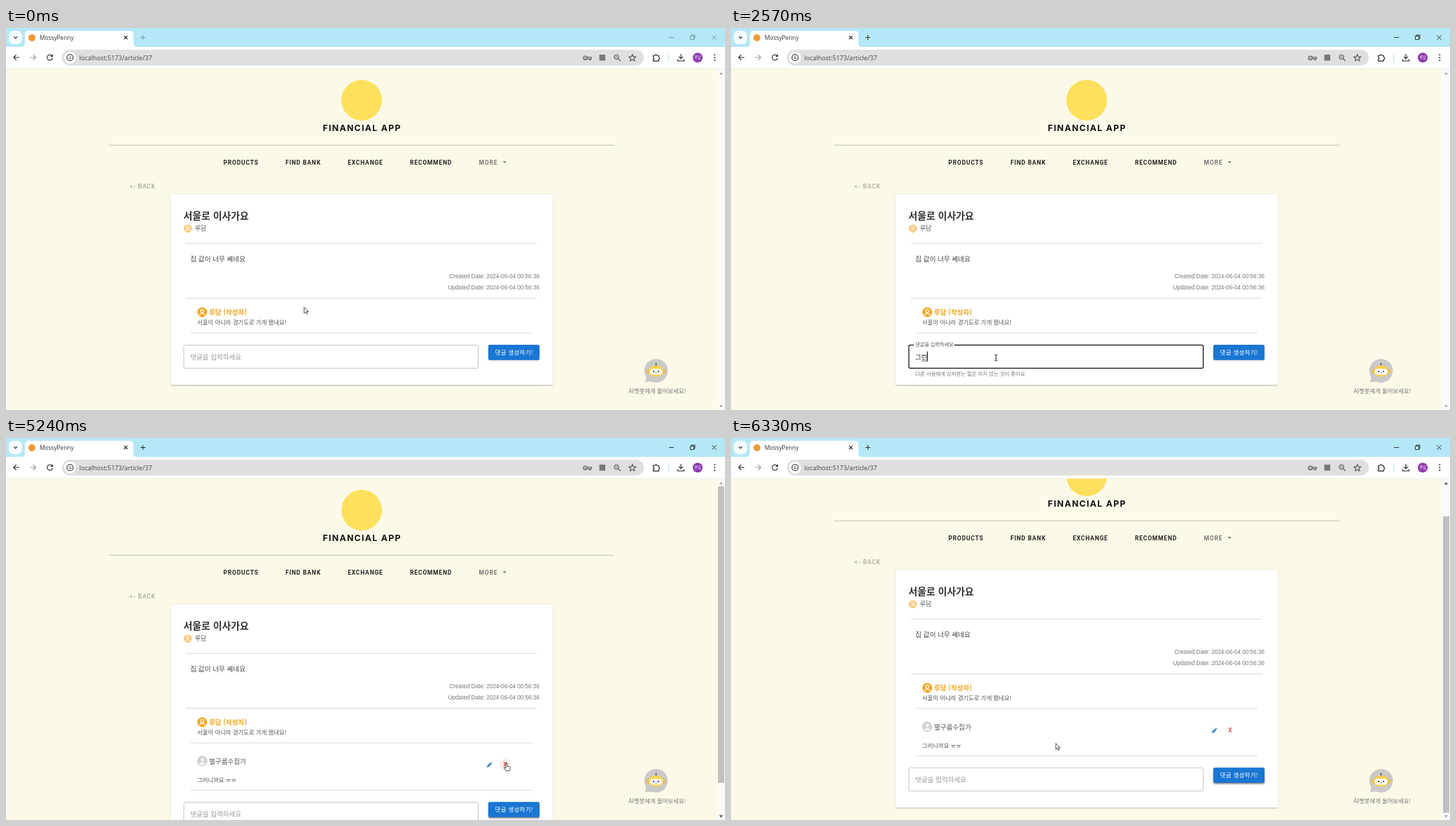
Recreate the animation shown at these times as an HTML page. Size 1027 px wide and 545 px high, loop 7.25 s.

```html
<!DOCTYPE html>
<html lang="ko">
<head>
<meta charset="utf-8">
<title>MossyPenny</title>
<style>
html, body { margin: 0; width: 100%; height: 100%; overflow: hidden; background: #fdf9e8; }
svg { display: block; width: 1027px; height: 545px; }
text { font-family: "Noto Sans CJK KR", "Noto Sans CJK JP", sans-serif; fill: #555; white-space: pre; }
.nav text { font: 600 8.5px Roboto, sans-serif; letter-spacing: .8px; fill: #222; }
.date { font: 8.17px "Liberation Sans", sans-serif; fill: #777; text-anchor: end; }
.ui { font-family: "Open Sans", sans-serif; fill: #333; }
.line { fill: none; stroke: #222; stroke-width: 1.1; }
.rule { stroke: #d9d9d9; }
.s84 { font-size: 8.4px; }
.s96 { font-size: 9.6px; }
</style>
</head>
<body>
<svg viewBox="0 0 1027 545">
  <defs>
    <filter id="soft" x="-10%" y="-30%" width="120%" height="170%"><feGaussianBlur stdDeviation="1"/></filter>
    <clipPath id="buttonClip"><rect x="689" y="452" width="73" height="21.7" rx="2"/></clipPath>
    <g id="person">
      <circle r="7"/>
      <g fill="none" stroke="#fff" stroke-width="1.2"><circle cy="-1.6" r="2.2"/><path d="M-3.9 4.6C-3 .8 3 .8 3.9 4.6"/></g>
    </g>
  </defs>
  <rect width="1027" height="545" fill="#fdf9e8"/>

  <g id="page">
    <circle cx="508" cy="103" r="29" fill="#fde05c"/>
    <text x="508.6" y="147" text-anchor="middle" style="font:700 12.3px Inter,sans-serif;letter-spacing:1.3px;fill:#111">FINANCIAL APP</text>
    <path d="M147 167.2H869" stroke="#c4c1b4"/>
    <g class="nav">
      <text x="310.5" y="194.7">PRODUCTS</text>
      <text x="399.3" y="194.7">FIND BANK</text>
      <text x="488.2" y="194.7">EXCHANGE</text>
      <text x="577" y="194.7">RECOMMEND</text>
      <text x="675.5" y="194.7" style="fill:#777">MORE</text>
      <text x="176.3" y="229" style="fill:#b5b2a6">&lt;- BACK</text>
    </g>
    <path d="M709.6 190.3h5l-2.5 2.5z" fill="#666"/>

    <rect class="card" x="235" y="237.8" width="546" height="272" rx="2" fill="#0005" filter="url(#soft)"/>
    <rect class="card" x="234.5" y="237" width="547" height="272" rx="2" fill="#fff"/>
    <text x="253.5" y="273.4" style="font-size:13.9px;font-weight:700;fill:#333">서울로 이사가요</text>
    <use href="#person" transform="translate(259.7 286.2) scale(.83)" fill="#f9c878"/>
    <text x="270" y="289" style="font-size:8.8px">루담</text>
    <path class="rule" d="M257 307.3H758M257 385.5H758M263.5 435H752"/>
    <text class="s96" x="263.3" y="333" style="fill:#444">집 값이 너무 쎄네요</text>
    <text class="date" x="762" y="357">Created Date: 2024-06-04 00:56:36</text>
    <text class="date" x="762" y="373">Updated Date: 2024-06-04 00:56:36</text>
    <use href="#person" x="280.3" y="405.5" fill="#f5a623"/>
    <text class="s96" x="290" y="409" style="font-weight:700;fill:#f0a41c">루담 (작성자)</text>
    <text class="s84" x="273" y="423.2">서울이 아니라 경기도로 가게 됐네요!</text>

    <g id="reply">
      <circle cx="280.3" cy="461" r="7.4" fill="#d2d2d2"/>
      <path d="M275.8 465.6C276.5 461.8 284 461.8 284.8 465.6Q280.3 468.6 275.8 465.6" fill="#f3f3f3"/>
      <circle cx="280.3" cy="459" r="2.5" fill="#f3f3f3"/>
      <text class="s96" x="290" y="464.6">별구름수집가</text>
      <text class="s84" x="273" y="490.6">그러니까요 ㅠㅠ</text>
      <path class="rule" d="M263.5 502.4H752"/>
      <path d="M687 469.8v-1.7l4.4-4.4 1.7 1.7-4.4 4.4zM691.8 463.3l.9-.9 1.7 1.7-.9.9z" fill="#1976d2"/>
      <circle id="deleteHover" cx="713" cy="466.3" r="8.5" fill="#fdeeee"/>
      <text x="713" y="469.4" text-anchor="middle" style="font:500 8.4px Roboto,sans-serif;fill:#e53935">X</text>
    </g>

    <g id="form">
      <rect id="border" x="254" y="452.4" width="420.5" height="33" rx="2.2" fill="#fff"/>
      <rect id="notch" x="261" y="450" width="58" height="4" fill="#fff"/>
      <text id="label" style="font-size:9.55px">댓글을 입력하세요</text>
      <text id="typed" x="263" y="472.5" style="font-size:9.55px;fill:#333"></text>
      <path id="underline" stroke="#333" stroke-width=".6"/>
      <path id="caret" stroke="#000"/>
      <text id="helper" x="263.3" y="496.3" style="font-size:7.37px;fill:#777">다른 사람에게 상처받는 말은 하지 않는 것이 좋아요</text>
      <rect id="shadow" x="689" width="73" height="21.7" rx="2" filter="url(#soft)"/>
      <rect x="689" y="452" width="73" height="21.7" rx="2" fill="#1976d2"/>
      <circle id="ripple" cx="716.5" cy="463" fill="#fff" clip-path="url(#buttonClip)"/>
      <text x="725.7" y="466" text-anchor="middle" style="font-size:8.5px;font-weight:500;letter-spacing:.28px;fill:#fff">댓글 생성하기!</text>
    </g>
  </g>

  <!-- chat helper -->
  <path d="M915 496L913 505.3 925 504z" fill="#c9c9c9"/>
  <circle cx="928.5" cy="489" r="16.8" fill="#c9c9c9"/>
  <path d="M928.5 478v4" stroke="#444" stroke-width="1.4"/>
  <rect x="915.5" y="486.5" width="26" height="7" rx="3" fill="#eeb83c"/>
  <ellipse cx="928.5" cy="489.5" rx="11" ry="8" fill="#fbd04e"/>
  <rect x="919.5" y="486" width="18" height="8.6" rx="4.3" fill="#fff"/>
  <circle cx="925" cy="490" r="1.1" fill="#333"/><circle cx="932" cy="490" r="1.1" fill="#333"/>
  <path d="M927 491.5q1.5 1.5 3 0" fill="none" stroke="#555" stroke-width=".7"/>
  <text class="s84" x="930.2" y="521.2" text-anchor="middle" style="fill:#777">AI챗봇에게 물어보세요!</text>

  <!-- scrollbar -->
  <rect x="1016" y="58" width="11" height="487" fill="#fafafa"/>
  <rect id="thumb" x="1017" width="9" height="423" fill="#c1c1c1"/>
  <path id="arrowUp" d="M1018.8 66.3h5.2l-2.6-3.2z"/>
  <path id="arrowDown" d="M1018.8 538.3h5.2l-2.6 3.2z"/>

  <!-- browser frame -->
  <rect width="1027" height="27" fill="#b5e8f6"/>
  <rect y="27" width="1027" height="31" fill="#fff"/>
  <path d="M0 57.7H1027" stroke="#e2e2e2" stroke-width=".6"/>
  <rect x="4" y="4" width="19" height="19" rx="7" fill="#f4fcff"/>
  <path class="line" d="M11.2 12.3l2.4 2.4 2.4-2.4"/>
  <path d="M22 27q5 0 5-5V9.5q0-5.5 5.5-5.5H176.500q5.500 0 5.500 5.500V22q0 5 5 5z" fill="#fff"/>
  <circle cx="37" cy="14" r="5" fill="#f09a35"/>
  <text class="ui" x="48" y="17.3" style="font-size:8.3px">MossyPenny</text>
  <path class="line" d="M168.7 11.2l4.8 4.8m0-4.8l-4.8 4.8"/>
  <path id="windowButtons" fill="none" stroke-width=".9" d="M192 13.5h7M195.5 10v7M947 13.5h7M977.5 11.5h5v5h-5zM979 11.5v-1.5h5v5h-1.5M1008.3 10.3l6.4 6.4m0-6.4l-6.4 6.4"/>
  <path class="line" d="M19 42H11M14.7 38.2L10.9 42l3.8 3.8"/>
  <path class="line" d="M34.5 42h8M38.7 38.2L42.5 42l-3.8 3.8" style="stroke:#999"/>
  <path class="line" d="M66 40a3.9 3.9 0 1 0 .5 3M66.6 37.8v2.7h-2.7"/>
  <rect x="80" y="31" width="831" height="22.5" rx="11.2" fill="#dfdfdf"/>
  <circle cx="91.5" cy="42.3" r="8.5" fill="#fff"/>
  <circle class="line" cx="91.5" cy="42.3" r="4.5"/>
  <path class="line" d="M91.5 41.8v2.8M91.5 39.7v1.1"/>
  <text class="ui" x="104.7" y="45.7" style="font-size:9.05px;fill:#444">localhost:5173/article/37</text>
  <g class="line" style="stroke:#555">
    <circle cx="827.5" cy="42.7" r="2.7"/><path d="M830.2 41.7h6v2h-1v1.8h-2v-1.8h-3"/><circle cx="827.5" cy="42.7" r=".3"/>
    <circle cx="872" cy="41.3" r="3.1"/><path d="M874.3 43.6l3.3 3.4M870.5 41.3h3"/>
    <path d="M894.7 37.7l1.4 3.2 3.5.3-2.7 2.3.9 3.4-3.1-1.8-3.1 1.8.9-3.4-2.7-2.3 3.5-.3z"/>
  </g>
  <rect x="847.5" y="38" width="8.5" height="8.5" fill="#777"/>
  <path class="line" d="M924.5 39.3h2.5a1.4 1.4 0 0 1 2.8 0h2.5v2.5a1.4 1.4 0 0 1 0 2.8v2.5h-7.8v-2.5a1.4 1.4 0 0 0 0-2.8z"/>
  <path d="M946.5 37.5v10" stroke="#b5e8f6" stroke-width="1.2"/>
  <path class="line" d="M964 37v6.5M961 40.8l3 3 3-3M959.5 44.5v2.5h9v-2.5"/>
  <circle cx="988" cy="42.3" r="7" fill="#8e3bb0"/>
  <text x="988" y="44.2" text-anchor="middle" style="font-size:5.2px;fill:#fff">루담</text>
  <g fill="#222"><circle cx="1012.3" cy="38.3" r="1"/><circle cx="1012.3" cy="42.2" r="1"/><circle cx="1012.3" cy="46.1" r="1"/></g>

  <g id="cursor" fill="#fff" stroke="#222" stroke-width=".8" stroke-linejoin="round">
    <path id="arrow" d="M0 0V8.6L2 6.9 3.4 9.9 4.8 9.2 3.5 6.3H6.1z"/>
    <path id="beam" fill="none" stroke-width="1" d="M-2-4.2h1.4L0-3.7.6-4.2H2M0-3.7V3.7M-2 4.2h1.4L0 3.7.6 4.2H2"/>
    <path id="hand" d="M-1 0Q0-1 1 0V4.2L4.6 5Q5.7 5.4 5.5 6.6L4.6 10.8H-.6L-3.6 6.9Q-3.6 5.5-2.3 5.9L-1 7z"/>
  </g>
</svg>
<script>
const LOOP = 7250;
const BASE = '그러니까요';
const typing = [
  [0, ''], [1270, 'r'], [1870, ''], [2070, 'ㄱ'], [2170, '그'], [2370, '글'], [2470, '그러'],
  [2570, '그런'], [2670, '그러니'], [2870, '그러닊'], [2970, '그러니까'], [3170, '그러니깡'],
  [3270, BASE], [3470, BASE + ' '], [3570, BASE + ' ㅠ'], [3770, BASE + ' ㅠㅠ'], [5060, '']
];

const $ = id => document.getElementById(id);
const set = (id, attrs) => { for (const k in attrs) $(id).setAttribute(k, attrs[k]); };
const show = (id, on) => set(id, { visibility: on ? 'visible' : 'hidden' });
const mix = (a, b, u) => a + (b - a) * u;
const ease = u => u * u * (3 - 2 * u);

// Progress in n equal jumps, the first at a and the last at b
const steps = (t, a, b, n) =>
  t < a ? 0 : Math.min(1, (Math.floor((t - a) / (b - a) * (n - 1) + 1e-6) + 1) / n);

function pointer(t) {
  if (t < 4170) {
    const u = ease(steps(t, 200, 690, 6));
    return [mix(425.8, 378.5, u), mix(398.3, 470.5, u)];
  }
  if (t < 5740) {
    const u = ease(steps(t, 4170, 4660, 6));
    return [mix(378.5, 715, u), mix(470.5, 464, u) - 232 * u * (1 - u)];
  }
  const u = ease(steps(t, 5740, 6130, 5));
  return [mix(715, 464, u), mix(464, 435.6, u)];
}

function drawField(t, inField) {
  const focused = t >= 970 && t < 4860;
  const filled = t >= 970 && t < 5060;
  const up = steps(t, 970, 1170, 3) - steps(t, 5060, 5240, 3);
  set('border', {
    stroke: focused ? '#111' : filled ? '#444' : inField ? '#222' : '#bdbdbd',
    'stroke-width': focused ? 1.25 : .9
  });
  set('label', { transform: `translate(263.2 ${mix(472.5, 454.3, up)}) scale(${mix(1, .75, up)})` });
  $('label').style.fill = filled ? '#555' : '#999';
  show('notch', up > .5);
  show('helper', filled);

  const text = typing.findLast(([start]) => t >= start)[1];
  if ($('typed').textContent !== text) $('typed').textContent = text;
  const end = 263 + (text ? $('typed').getComputedTextLength() : 0);
  set('caret', { d: `M${end} 461.5v14` });
  show('caret', focused && t < 4170);
  set('underline', { d: `M${end - 8.3} 475.3h7.8` });
  show('underline', focused && /[ㄱ-힣]$/.test(text));
}

function draw(t) {
  const [x, y] = pointer(t);
  const posted = t >= 5060;
  const scroll = t < 6130 ? 0 : t < 6230 ? 2.6 : t < 6330 ? 27 : 49;
  const inField = !posted && x > 253 && x < 675 && y > 452 && y < 486;
  const onButton = t >= 4170 && t < 5740 && x > 689 && y > 452;

  set('page', { transform: `translate(0 ${-scroll})` });
  set('form', { transform: `translate(0 ${posted ? 67.3 : 0})` });
  document.querySelectorAll('.card').forEach(c => c.setAttribute('height', posted ? 339.3 : 272));
  show('reply', posted);
  show('deleteHover', posted && t < 5740);
  drawField(t, inField);

  const raised = t >= 4660;
  set('shadow', { y: raised ? 453.6 : 452.5, fill: raised ? '#0008' : '#0004' });
  set('ripple', {
    r: 21 + 25 * steps(t, 4960, 5060, 2),
    opacity: t < 4860 || t >= 5240 ? 0 : t < 5060 ? .3 : .12
  });

  show('thumb', posted);
  set('thumb', { y: 69 + scroll * .87 });
  set('arrowUp', { fill: scroll ? '#444' : '#a3a3a3' });
  set('arrowDown', { fill: posted && scroll < 49 ? '#444' : '#a3a3a3' });
  set('windowButtons', { stroke: t < 970 ? '#6f929c' : '#222' });

  set('cursor', { transform: `translate(${x} ${y})` });
  show('beam', inField);
  show('hand', onButton);
  show('arrow', !inField && !onButton);
}

(function frame() {
  draw(performance.now() % LOOP);
  requestAnimationFrame(frame);
})();
</script>
</body>
</html>
```
